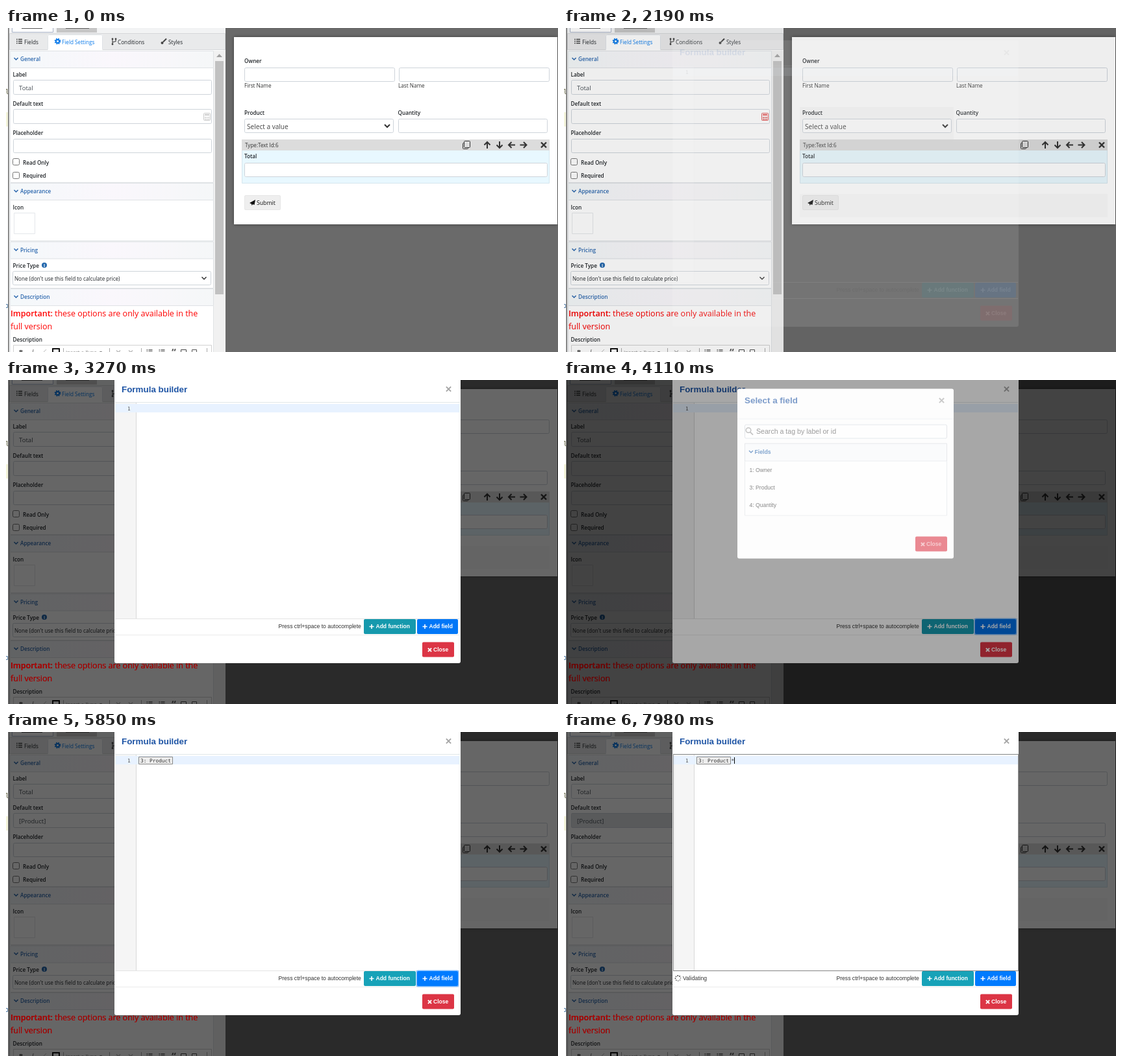
Recreate the animation shown at these times as an HTML page with a canvas. Size 850 by 500 pixels, loop 8000 ms.

```html
<!DOCTYPE html>
<html lang="en">
<head>
<meta charset="utf-8">
<title>Formula builder</title>
<style>
  html, body { margin: 0; width: 100%; height: 100%; overflow: hidden; }
  canvas { display: block; width: 850px; height: 500px; }
</style>
</head>
<body>
<canvas id="stage" width="850" height="500"></canvas>
<script>
const c = document.getElementById('stage').getContext('2d');
const UI = '"Open Sans", "Noto Sans", sans-serif';
const ARIAL = '"Liberation Sans", sans-serif';
const MONO = '"DejaVu Sans Mono", monospace';
const INK = '#212529', BLUE = '#2a66ad', BORDER = '#ced4da', LOOP = 8000;

const ramp = (t, from, to) => Math.min(1, Math.max(0, (t - from) / (to - from)));
const easeInOut = p => p < .5 ? 2 * p * p : 1 - 2 * (1 - p) ** 2;

function withAlpha(alpha, paint) {
  if (alpha <= 0) return;
  c.save();
  c.globalAlpha *= Math.min(1, alpha);
  paint();
  c.restore();
}

function box(x, y, w, h, fill, border, radius = 0) {
  c.beginPath();
  c.roundRect(x, y, w, h, radius);
  if (fill) { c.fillStyle = fill; c.fill(); }
  if (!border) return;
  c.beginPath();
  c.roundRect(x + .5, y + .5, w - 1, h - 1, radius);
  c.strokeStyle = border;
  c.lineWidth = 1;
  c.stroke();
}

function text(str, x, y, size = 8.2, color = INK, weight = 400, family = UI) {
  c.font = `${weight} ${size}px ${family}`;
  c.fillStyle = color;
  c.fillText(str, x, y);
}
const label = (str, x, y) => text(str, x, y, 8.2, INK, 600);
const arial = (str, x, y, size = 8.6, color = '#333', weight = 400) =>
  text(str, x, y, size, color, weight, ARIAL);
const input = (x, y, w, h = 22, fill = '#fff') => box(x, y, w, h, fill, BORDER, 2);

// Each stroke is a flat list of x, y pairs relative to the icon centre.
function icon(x, y, color, width, ...strokes) {
  c.strokeStyle = color;
  c.lineWidth = width;
  c.beginPath();
  for (const s of strokes)
    for (let i = 0; i < s.length; i += 2)
      c[i ? 'lineTo' : 'moveTo'](x + s[i], y + s[i + 1]);
  c.stroke();
}
const chevron = (x, y, color, r = 3, width = 1.5) => icon(x, y, color, width, [-r, -r / 2, 0, r / 2, r, -r / 2]);
const cross = (x, y, color, r, width) => icon(x, y, color, width, [-r, -r, r, r], [r, -r, -r, r]);
const plus = (x, y) => icon(x, y, '#fff', 1.6, [-3.5, 0, 3.5, 0], [0, -3.5, 0, 3.5]);

function disc(x, y, r, color) {
  c.fillStyle = color;
  c.beginPath();
  c.arc(x, y, r, 0, 7);
  c.fill();
}

function arrow(x, y, angle) {
  c.save();
  c.translate(x, y);
  c.rotate(angle);
  icon(0, 0, '#333', 2, [0, 5.5, 0, -4.5], [-4.5, 0, 0, -4.5, 4.5, 0]);
  c.restore();
}

function listIcon(x, y, color) {
  for (const dy of [-3, 0, 3])
    icon(x, y + dy, color, 1.4, [-4.5, 0, -2.8, 0], [-1.5, 0, 4.5, 0]);
}

function calculator(color) {
  box(304, 131, 11, 12, null, color, 1);
  box(306, 133, 7, 2, color);
  for (let i = 0; i < 6; i++) box(306 + i % 3 * 2.7, 137 + (i > 2) * 2.8, 1.7, 1.7, color);
}

function section(title, y, bodyEnd) {
  box(6, y, 314, bodyEnd - y, '#fff', '#dfe2e5');
  const tint = c.createLinearGradient(6, 0, 320, 0);
  tint.addColorStop(0, '#f4f8fa');
  tint.addColorStop(.5, '#faf7fc');
  tint.addColorStop(1, '#f5f7f8');
  box(6, y, 314, 27, tint, '#dfe2e5');
  chevron(15.5, y + 12.5, BLUE);
  text(title, 22, y + 16, 8.2, BLUE, 600);
}

function warning(color) {
  text('Important:', 7, 445, 12.5, color, 600);
  text('these options are only available in the', 75, 445, 12.5, color);
  text('full version', 7, 465, 12.5, color);
}

function drawSettings(t) {
  box(0, 0, 338, 500, '#fff');
  box(0, 130, 3, 22, '#f4f4da');
  text('l', -1, 102, 10, '#555533', 400, MONO);
  text('o', -2, 432, 10, '#336699', 400, MONO);
  box(3, 0, 2, 500, '#8a8a8a');
  box(5, 0, 333, 8, '#f2f3f4');
  box(9, -5, 64, 12, '#fff', '#aab4c8');
  box(78, -5, 62, 12, '#c6c6c6');
  box(24, 0, 32, 1, '#555');
  box(92, 0, 36, 1, '#666');

  box(5, 8, 333, 26, '#e9eaeb', '#d5d7d9');
  box(64, 10, 85, 25, '#fff', '#dee2e6', 2);
  box(65, 33, 83, 3, '#fff');
  listIcon(20.5, 20.5, '#444');
  text('Fields', 28, 25);
  c.strokeStyle = '#0b7bea';
  c.lineWidth = 2;
  c.beginPath(); c.arc(79.5, 20.5, 2.6, 0, 7); c.stroke();
  c.setLineDash([1.7, 1.4]);
  c.beginPath(); c.arc(79.5, 20.5, 3.9, 0, 7); c.stroke();
  c.setLineDash([]);
  text('Field Settings', 86, 25, 8.2, '#0b7bea');
  icon(166, 20.5, '#444', 1.1, [-2, -3, -2, 4], [3, -3, 3, 0, -2, 1.5]);
  for (const [x, y] of [[164, 17], [164, 25], [169, 17]]) disc(x, y, 1.4, '#444');
  text('Conditions', 172, 25);
  icon(243, 20.5, '#444', 2, [4, -4, -1, 1]);
  disc(240.5, 23, 2, '#444');
  text('Styles', 250, 25);

  section('General', 35, 239);
  label('Label', 10.5, 75);
  input(11, 80, 306, 23);
  text('Total', 20, 96, 9.6, '#495057');
  label('Default text', 10.5, 120);
  const inserted = t >= 5850;
  input(11, 125, 306, 23);
  if (inserted) {
    withAlpha(ramp(t, 5850, 5940), () => input(11, 125, 306, 23, '#dfe2e5'));
    text('[Product]', 20, 141, 9.6, '#495057');
  }
  calculator('#c9c9c9');
  withAlpha(ramp(t, 1620, 1770), () => calculator('#e34a4a'));
  label('Placeholder', 10.5, 165);
  input(11, 171, 306);
  for (const [name, y] of [['Read Only', 201], ['Required', 221.5]]) {
    box(10, Math.round(y), 11, 11, '#fff', '#767676', 2);
    label(name, 26, y + 9.7);
  }

  section('Appearance', 239, 329);
  label('Icon', 10.5, 280);
  box(12, 285, 33, 33, '#fff', '#e4e7ea');

  section('Pricing', 329.5, 402);
  label('Price Type', 10.5, 370);
  disc(59, 366, 4, '#2468ad');
  text('i', 57.9, 368.7, 7, '#fff', 700);
  input(10, 375, 306);
  text("None (don't use this field to calculate price)", 13, 390, 8.1);
  chevron(305, 386, '#333', 3.5);

  section('Description', 402, 510);
  warning('#f00');
  label('Description', 10.5, 484);
  box(11, 489, 306, 20, '#fff', '#d1d1d1');
  text('B', 20, 503, 9, '#444', 700);
  text('I', 40, 503, 9, '#444', 'italic');
  icon(60, 499, '#bbb', 1, [-3, 2, 2, -3]);
  box(71, 494, 12, 10, '#111');
  box(73, 496, 8, 4, '#fff');
  for (const x of [88, 159, 208, 309]) box(x, 494, 1, 8, '#aaa');
  text('Insert a Type  ▾', 92, 503, 8, '#888');
  chevron(173, 499, '#bbb', 3);
  chevron(192, 499, '#bbb', 3);
  listIcon(221, 500, '#555');
  listIcon(240, 500, '#555');
  text('“', 255, 505, 15, '#555', 700);
  box(269, 496, 9, 8, null, '#444');
  box(286, 496, 8, 8, null, '#555');

  box(320, 35, 18, 465, '#f1f1f1');
  box(322, 51, 13, 360, '#c1c1c1');
  c.fillStyle = '#a0a0a0';
  c.beginPath(); c.moveTo(324, 45); c.lineTo(328.5, 40); c.lineTo(333, 45); c.fill();
}

function hover(x, y, w, bodyHeight, amount) {
  withAlpha(amount, () => {
    box(x, y, w, 17, '#ededed');
    box(x, y + 17, w, bodyHeight, '#ededed');
  });
}

function drawForm(t) {
  box(338, 0, 512, 500, '#6a6a6a');
  c.save();
  c.shadowColor = 'rgba(0,0,0,.45)';
  c.shadowBlur = 5;
  box(351, 14, 498, 289, '#fff');
  c.restore();

  const enter = ramp(t, 450, 750), leave = ramp(t, 870, 1170);
  hover(363, 26, 474, 62, .5 * Math.sin(Math.PI * enter));
  hover(363, 105, 237, 50, enter * (1 - leave));
  hover(363, 239, 474, 36, .4 * Math.sin(Math.PI * leave));
  withAlpha(leave * .4, () => {
    box(363, 122, 237, 50, '#ededed');
    box(363, 256, 474, 36, '#f2f2f2');
  });

  label('Owner', 367, 54);
  input(367, 61, 232);
  input(605, 61, 232);
  text('First Name', 367, 92, 8.2, '#333');
  text('Last Name', 604, 92, 8.2, '#333');
  label('Product', 367, 134);
  input(367, 140, 230);
  text('Select a value', 371, 156, 10.1, '#444');
  chevron(587, 151, '#333', 4, 2);
  label('Quantity', 603.5, 134);
  input(604, 140, 230);

  box(363, 172, 474, 68, '#e8f8ff', '#d5e6ee');
  box(363, 172, 474, 17, '#dcdcdc');
  text('Type:Text Id:6', 368, 184, 8.1, '#333');
  box(703, 177, 9, 10, null, '#333', 1);
  box(705, 174, 10, 11, '#dcdcdc', '#333', 1);
  arrow(741, 180.5, 0);
  arrow(760, 180.5, Math.PI);
  arrow(778.5, 180.5, -Math.PI / 2);
  arrow(797, 180.5, Math.PI / 2);
  cross(828, 180.5, '#333', 4, 2.4);
  label('Total', 367, 201);
  input(367, 208, 467);

  box(367, 258, 56, 23, '#efefef', '#e6e6e6', 2);
  c.fillStyle = '#111';
  c.beginPath();
  for (const [x, y] of [[384, 265], [375, 270], [378, 271.5], [378.5, 274], [380, 272], [382.5, 273]]) c.lineTo(x, y);
  c.fill();
  text('Submit', 386, 273, 8.7, '#111');
}

function button(x, y, w, str, color, shade = 0) {
  box(x, y, w, 23, color, null, 2);
  if (shade > 0) box(x, y, w, 23, `rgba(0,0,0,${shade})`, null, 2);
  if (str === 'Close') cross(x + 11.5, y + 12, '#fff', 2.6, 2);
  else plus(x + 12, y + 11.5);
  arial(str, x + (str === 'Close' ? 17 : 18.5), y + 14.3, 8.5, '#fff', 700);
}

function dialog(x, y, w, h, title, solidity) {
  withAlpha(solidity, () => box(x, y, w, h, '#fff', null, 3));
  arial(title, x + 11, 18.5, 13.4, '#1f55a5', 700);
  cross(x + w - 18.5, 14, '#a5a5a5', 3.6, 2);
}

function spinner(t) {
  for (let i = 0; i < 8; i++) {
    const a = (t / 2000 + i / 8) * Math.PI * 2;
    disc(175.5 + 4 * Math.cos(a), 380 + 4 * Math.sin(a), .7 + i * .05, '#444');
  }
}

function drawBuilder(t) {
  const alpha = ramp(t, 2180, 2280);
  withAlpha(alpha, () => {
    c.translate(0, 24 * (1 - easeInOut(ramp(t, 2190, 2460))));
    dialog(167, -5, 533, 442, 'Formula builder', 1);
    box(168, 34, 531, 1, '#e0e6e8');
    box(168, 35, 32, 333, '#f5f5f5');
    box(200, 35, 1, 333, '#d8d8d8');
    box(168, 37, 531, 13, '#e8f2ff');
    text('1', 187, 47, 7.8, '#555', 400, MONO);
    box(168, 368, 531, 1, '#e4e4e4');
    box(168, 393, 531, 1, '#ebebeb');

    if (t >= 5850) {
      box(204, 38, 53, 12, '#eeeeee', '#888');
      text('3: Product', 207, 47, 7.8, '#333', 400, MONO);
    }
    if (t >= 6390) {
      c.strokeStyle = '#222';
      c.lineWidth = 1;
      c.setLineDash([1, 1]);
      c.strokeRect(168.5, 34.5, 531, 334);
      c.setLineDash([]);
      const typed = t >= 7380;
      if (typed) text('*', 257.5, 47, 7.8, '#333', 400, MONO);
      box(typed ? 262 : 257, 39, 1, 10, '#000');
    }
    if (t >= 6570) {
      spinner(t);
      arial('Validating', 183, 383);
    }

    arial('Press ctrl+space to autocomplete', 419.5, 383);
    const open = t < 5850;
    const functionShade = open ? .18 * ramp(t, 2760, 2850) - .12 * ramp(t, 3180, 3270) : 0;
    const fieldShade = open ? .03 * ramp(t, 3180, 3270) + .08 * ramp(t, 3780, 3840) : 0;
    button(551, 369, 80, 'Add function', '#17a2b8', functionShade);
    if (t >= 3990)
      withAlpha(1 - ramp(t, 5850, 5940), () => box(631.5, 367.5, 66, 26, '#80bdff', null, 3));
    button(633, 369, 63, 'Add field', '#007bff', fieldShade);
    button(641, 404.5, 49, 'Close', '#dc3545');
  });
}

function drawPicker(t) {
  const alpha = ramp(t, 3990, 4200);
  withAlpha(alpha * .6, () => box(4, 0, 846, 500, '#000'));
  c.save();
  c.translate(0, 24 * (1 - easeInOut(ramp(t, 3990, 4320))));
  // The white sheet turns opaque sooner than what lies on it.
  withAlpha(alpha * 1.7, () => box(267, -4, 333, 262, '#fff', null, 3));
  withAlpha(alpha, () => {
    dialog(267, -4, 333, 262, 'Select a field', 0);
    box(267, 42, 333, 1, '#e9ecef');
    input(278, 51, 312);
    c.strokeStyle = '#999';
    c.lineWidth = 1.5;
    c.beginPath(); c.arc(284, 60, 3.8, 0, 7); c.stroke();
    icon(284, 60, '#999', 1.8, [3, 3, 7, 7]);
    arial('Search a tag by label or id', 296, 65, 10.6, '#555');
    box(278, 80, 312, 112, '#fff', '#dfe2e5');
    box(278, 80, 312, 28, '#f8fafb', '#dfe2e5');
    chevron(288, 93, BLUE);
    arial('Fields', 293.5, 96, 8.7, BLUE, 700);
    ['1: Owner', '3: Product', '4: Quantity'].forEach((name, i) => arial(name, 285.5, 124.5 + 27 * i));
    button(541, 224, 49, 'Close', '#dc3545');
  });
  c.restore();
}

function draw(t) {
  drawSettings(t);
  drawForm(t);
  const dim = ramp(t, 2180, 2280);
  withAlpha(dim * .6, () => box(4, 0, 846, 500, '#000'));
  withAlpha(dim, () => warning('#b40000'));
  drawBuilder(t);
  if (t >= 3990 && t < 5850) drawPicker(t);
}

function tick() {
  draw(performance.now() % LOOP);
  requestAnimationFrame(tick);
}
tick();
</script>
</body>
</html>
```
